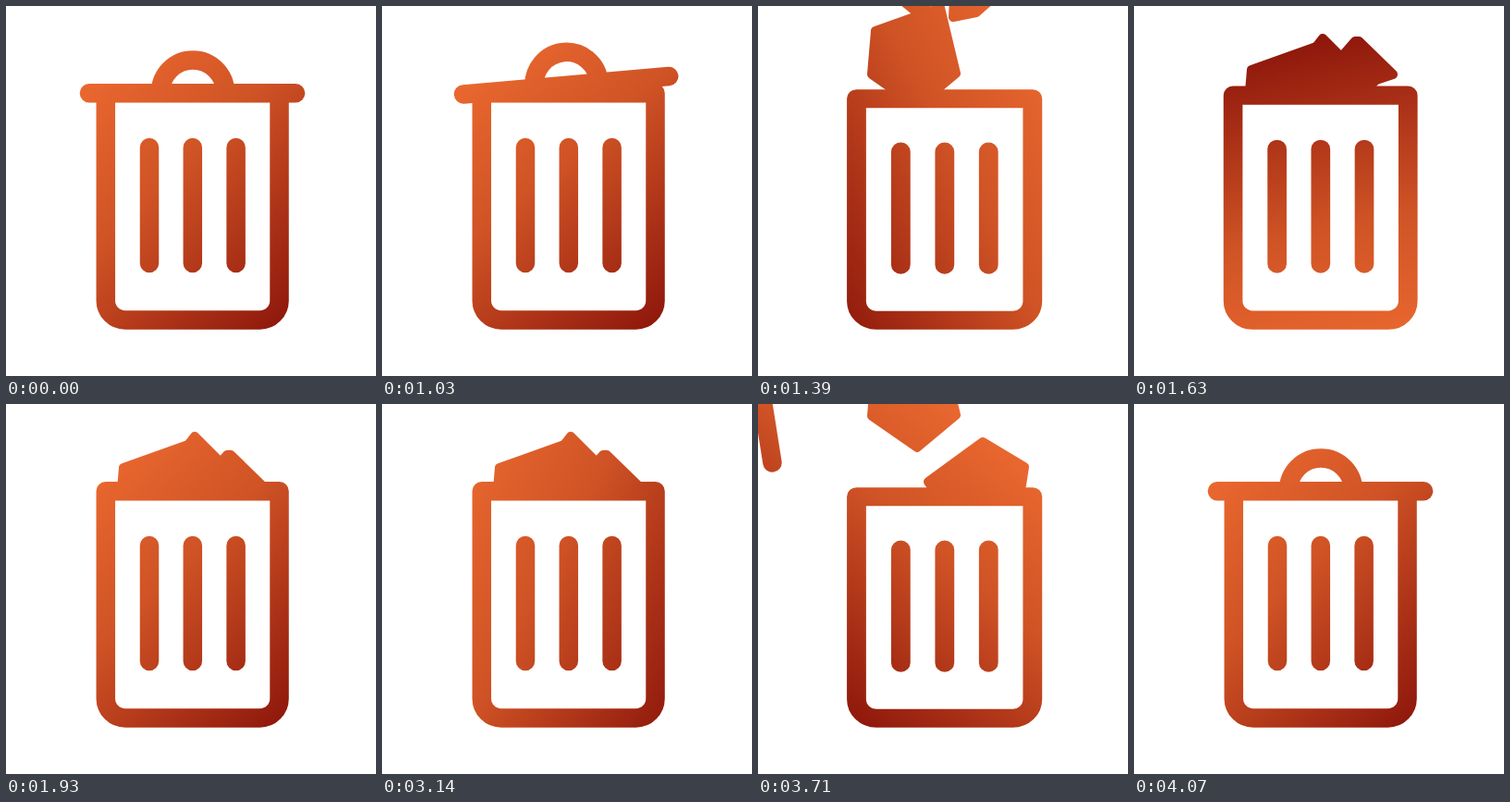
These frames come from a looping animation (400 px wide and 400 px high, 4.1 s). An HTML page without scripts:

```html
<!DOCTYPE html>
<html lang="en">
<head>
<meta charset="utf-8">
<title>Trash can</title>
<style>
  html, body { margin: 0; width: 100%; height: 100%; overflow: hidden; background: #fff; }
  svg { display: block; width: 100%; height: 100%; }

  .move { animation: 4100ms linear infinite; }
  .shade { animation-name: shade; transform-origin: 201px 208px; }
  .lid { animation-name: lid; transform-origin: 102px 117px; }
  .can { animation-name: squash; transform-origin: 201.5px 350px; }
  .first { animation-name: first; }
  .left { animation-name: left; }
  .middle { animation-name: middle; }
  .sunk { animation-name: sunk; }
  .right { animation-name: right; }

  .line { fill: none; stroke: #fff; stroke-width: 20.5; stroke-linecap: round; stroke-linejoin: round; }
  .paper { fill: #fff; stroke: #fff; stroke-width: 10; stroke-linejoin: round; }

  /* The light turns once around while the can fills, and back while it empties. */
  @keyframes shade {
    0%, 25.11%, 99.27%, 100% { transform: rotate(0deg); }
    25.12%, 98.54%, 99.25% { transform: rotate(4deg); }
    25.85% { transform: rotate(4deg); animation-timing-function: cubic-bezier(.5, .2, .85, .75); }
    33.17%, 90.49% { transform: rotate(85deg); }
    91.2% { transform: rotate(85deg); animation-timing-function: cubic-bezier(.15, .25, .5, .8); }
    33.9%, 34.6%, 89.76% { transform: rotate(108deg); }
    47.07%, 76.57% { transform: rotate(360deg); }
    76.59%, 77.3% { transform: rotate(343deg); }
  }

  @keyframes lid {
    0%, 25.11%, 99.27%, 100% { transform: translate(0, 0) rotate(0deg); }
    25.12%, 98.54%, 99.25% { transform: translate(0, 0) rotate(-5deg); }
    25.85% { transform: translate(0, 0) rotate(-5deg); animation-timing-function: cubic-bezier(.4, .25, .8, .8); }
    33.17%, 90.49% { transform: translate(-66px, -69px) rotate(-99deg); }
    91.2% { transform: translate(-66px, -69px) rotate(-99deg); animation-timing-function: cubic-bezier(.2, .2, .6, .75); }
    34.1%, 89.7% { transform: translate(-150px, -130px) rotate(-110deg); }
  }

  @keyframes squash {
    0%, 31.46%, 39%, 43%, 81%, 84.4%, 92.2%, 100% { transform: scale(1, 1); }
    32.7%, 34.6%, 89.76%, 91.2% { transform: scale(1.014, .977); }
    36.5%, 87% { transform: scale(1.02, .972); }
    40.2%, 83.4% { transform: scale(1.012, .986); }
  }

  /* Papers drop in one after another. */
  @keyframes first {
    0%, 30.73%, 92.93%, 100% { transform: translateY(-200px); }
    33.17%, 90.49%, 91.2% { transform: translateY(0); }
    33.9%, 89.76% { transform: translateY(90px); }
  }
  @keyframes left {
    0%, 31.3%, 92.4%, 100% { transform: translateY(-260px); }
    33.17%, 90.49%, 91.2% { transform: translateY(-103px); }
    33.9%, 34.6%, 89.76% { transform: translateY(-42px); }
    35.4%, 88.3% { transform: translateY(0); }
  }
  @keyframes middle {
    0%, 33.17%, 90.49%, 100% { transform: translateY(-198px); }
    33.9%, 34.6%, 89.76% { transform: translateY(-137px); }
    36.1%, 87.56% { transform: translateY(0); }
  }
  @keyframes sunk {
    0%, 33.17%, 90.49%, 100% { transform: translateY(-174px); }
    33.9%, 34.6%, 89.76% { transform: translateY(-113px); }
    36.6%, 87.1% { transform: translateY(80px); }
  }
  @keyframes right {
    0%, 37.56%, 86.1%, 100% { transform: translateY(-190px); }
    40%, 83.66% { transform: translateY(0); }
  }
</style>
</head>
<body>
<svg viewBox="0 0 400 400">
  <defs>
    <linearGradient id="ember" gradientUnits="userSpaceOnUse" x1="84" y1="91" x2="318" y2="325">
      <stop offset="0" stop-color="#e9672f"/>
      <stop offset=".4" stop-color="#cf5325"/>
      <stop offset="1" stop-color="#8f180c"/>
    </linearGradient>
    <path id="scrap" d="M239 55L243 55L280 91L262 97L236 120L211 125L213 85Z"/>

    <mask id="shape" maskUnits="userSpaceOnUse" x="0" y="0" width="400" height="400">
      <g class="paper">
        <path class="move first" d="M243 41L288 68L283 100L268 122L204 112L184 84Z"/>
        <path class="move left" d="M127 69L197 44L214 115L172 150L123 116Z"/>
        <path class="move middle" d="M204 35L245 76L200 118L172 144L140 118Z"/>
        <use class="move sunk" href="#scrap"/>
        <use class="move right" href="#scrap"/>
      </g>
      <g class="move lid line">
        <path d="M90 94.3H313"/>
        <path d="M167 93.5a35 35 0 0 1 70 0"/>
      </g>
      <g class="move can line">
        <path fill="#000" d="M107.8 94.3H295.5V318.5a21 21 0 0 1-21 21H128.8a21 21 0 0 1-21-21Z"/>
        <path d="M155 153V278M201.8 153V278M248.6 153V278"/>
      </g>
    </mask>
  </defs>

  <g mask="url(#shape)">
    <rect class="move shade" x="-250" y="-250" width="900" height="900" fill="url(#ember)"/>
  </g>
</svg>
</body>
</html>
```
